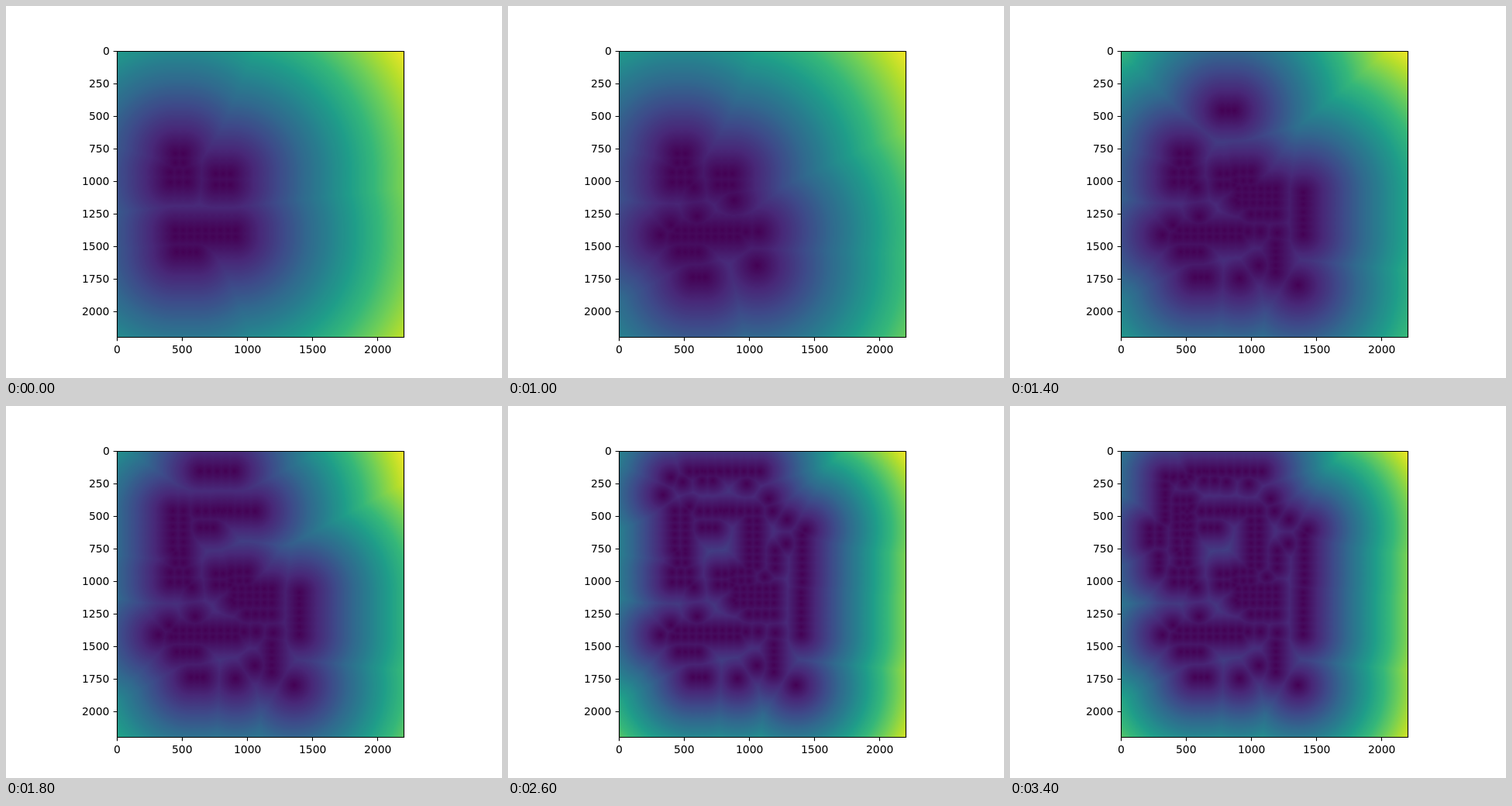
Recreate the animation shown at these times as an HTML page with a canvas. Size 640 px wide and 480 px high, loop 3600 ms.

```html
<!DOCTYPE html>
<html lang="en">
<head>
<meta charset="utf-8">
<title>Distance field</title>
<style>
html, body { margin: 0; width: 100%; height: 100%; overflow: hidden; background: #fff; }
canvas, svg { position: absolute; left: 0; top: 0; display: block; }
text { font: 13.89px "DejaVu Sans", sans-serif; fill: #000; }
path { fill: none; stroke: #000; stroke-width: 1.11; }
</style>
</head>
<body>
<canvas id="view" width="640" height="480"></canvas>
<svg id="axes" width="640" height="480"></svg>
<script>
const STEP = 200;
const LEFT = 143, TOP = 58, SIZE = 370;
const X0 = 143.2, Y0 = 57.6, SCALE = 0.168;
const SPACING = 60;   // gap between sites, in data units
const PEAK = 0.98;    // palette position of the farthest point

const STOPS = "440154 482878 3e4989 31688e 26828e 1f9e89 35b779 6ece58 b5de2b fde725"
  .split(" ").map(hex => [0, 2, 4].map(i => parseInt(hex.slice(i, i + 2), 16)));

function palette(t) {
  const p = t * (STOPS.length - 1), i = Math.min(STOPS.length - 2, Math.floor(p));
  return STOPS[i].map((c, k) => c + (STOPS[i + 1][k] - c) * (p - i));
}
const LUT = Array.from({ length: 256 }, (_, i) => palette(i / 255));

const field = new Float32Array(SIZE * SIZE).fill(Infinity);
const frames = [];

// Lower the field to the squared distance from one site.
function addSite(sx, sy) {
  for (let j = 0, i = 0; j < SIZE; j++) {
    const y = (TOP + j + 0.5 - Y0) / SCALE - sy;
    for (let k = 0; k < SIZE; k++, i++) {
      const x = (LEFT + k + 0.5 - X0) / SCALE - sx;
      const d = x * x + y * y;
      if (d < field[i]) field[i] = d;
    }
  }
}

// Evenly spaced values from a to b; a short span gives only its middle.
function spread(a, b) {
  const n = Math.round(Math.abs(b - a) / SPACING);
  return n ? Array.from({ length: n + 1 }, (_, i) => a + (b - a) * i / n) : [(a + b) / 2];
}

function snapshot() {
  const max = field.reduce((a, b) => Math.max(a, b));
  const img = new ImageData(SIZE, SIZE);
  field.forEach((d, i) => {
    const c = LUT[Math.round(255 * PEAK * Math.sqrt(d / max))];
    img.data.set([c[0], c[1], c[2], 255], 4 * i);
  });
  frames.push(img);
}

// Each step adds blocks of sites, given by two corners or a single point.
function step(...blocks) {
  for (const [x, y, x2 = x, y2 = y] of blocks)
    for (const sx of spread(x, x2))
      for (const sy of spread(y, y2)) addSite(sx, sy);
  snapshot();
}

step([450, 790, 510, 860], [410, 935, 540, 1010], [760, 945, 870, 1030],
  [450, 1380, 910, 1430], [460, 1545, 610, 1545]);
step([1060, 1650], [885, 1150], [575, 1050], [975, 1390]);
step([600, 1275], [1070, 1390]);
step([400, 1340]);
step([320, 1415], [420, 1430]);
step([570, 1740, 660, 1740]);
step([910, 1750], [1190, 1490, 1190, 1700], [1360, 1800], [1390, 1240, 1410, 1410],
  [1200, 1400], [1000, 1255, 1190, 1255]);
step([780, 460, 870, 460], [1400, 1090, 1400, 1180], [880, 930, 1000, 1000], [900, 1060, 1190, 1170]);
step([430, 465, 510, 760], [640, 590, 740, 590]);
step([640, 150, 900, 165], [620, 465, 1060, 465]);
step([540, 150, 1080, 170], [1180, 465], [540, 430], [1000, 540, 1060, 880], [1415, 650, 1400, 1010]);
step([1430, 610], [1285, 715], [1200, 770, 1200, 900], [1120, 970]);
step([1150, 370], [1290, 530], [980, 255]);
step([400, 205], [490, 240], [340, 340], [640, 230, 720, 230]);
step([345, 200, 530, 200], [810, 240]);
step([340, 270, 340, 490], [430, 380, 530, 640]);
step([220, 600, 300, 700], [340, 530]);
step([290, 810, 290, 910]);

function buildAxes() {
  let lines = "M143.5 58.5H513.5V427.5H143.5Z", labels = "";
  const snap = v => Math.round(v) + 0.5;
  const label = (v, x, y) => labels += `<text x="${Math.round(x)}" y="${Math.round(y)}">${v}</text>`;
  for (let v = 0; v <= 2000; v += 250) {
    const digits = String(v).length;
    const x = X0 + (v + 0.5) * SCALE, y = Y0 + (v + 0.5) * SCALE;
    lines += `M143.5 ${snap(y)}h-4.86`;
    label(v, 134 - 9 * digits, y + 5);
    if (v % 500 === 0) {
      lines += `M${snap(x)} 427.5v4.86`;
      label(v, x - 4.42 * digits, 448);
    }
  }
  document.getElementById("axes").innerHTML = `<path d="${lines}"/>${labels}`;
}

const ctx = document.getElementById("view").getContext("2d");
const start = performance.now();
let shown = -1;

function draw() {
  const n = Math.floor((performance.now() - start) / STEP) % frames.length;
  if (n !== shown) ctx.putImageData(frames[shown = n], LEFT, TOP);
  requestAnimationFrame(draw);
}

buildAxes();
draw();
</script>
</body>
</html>
```
